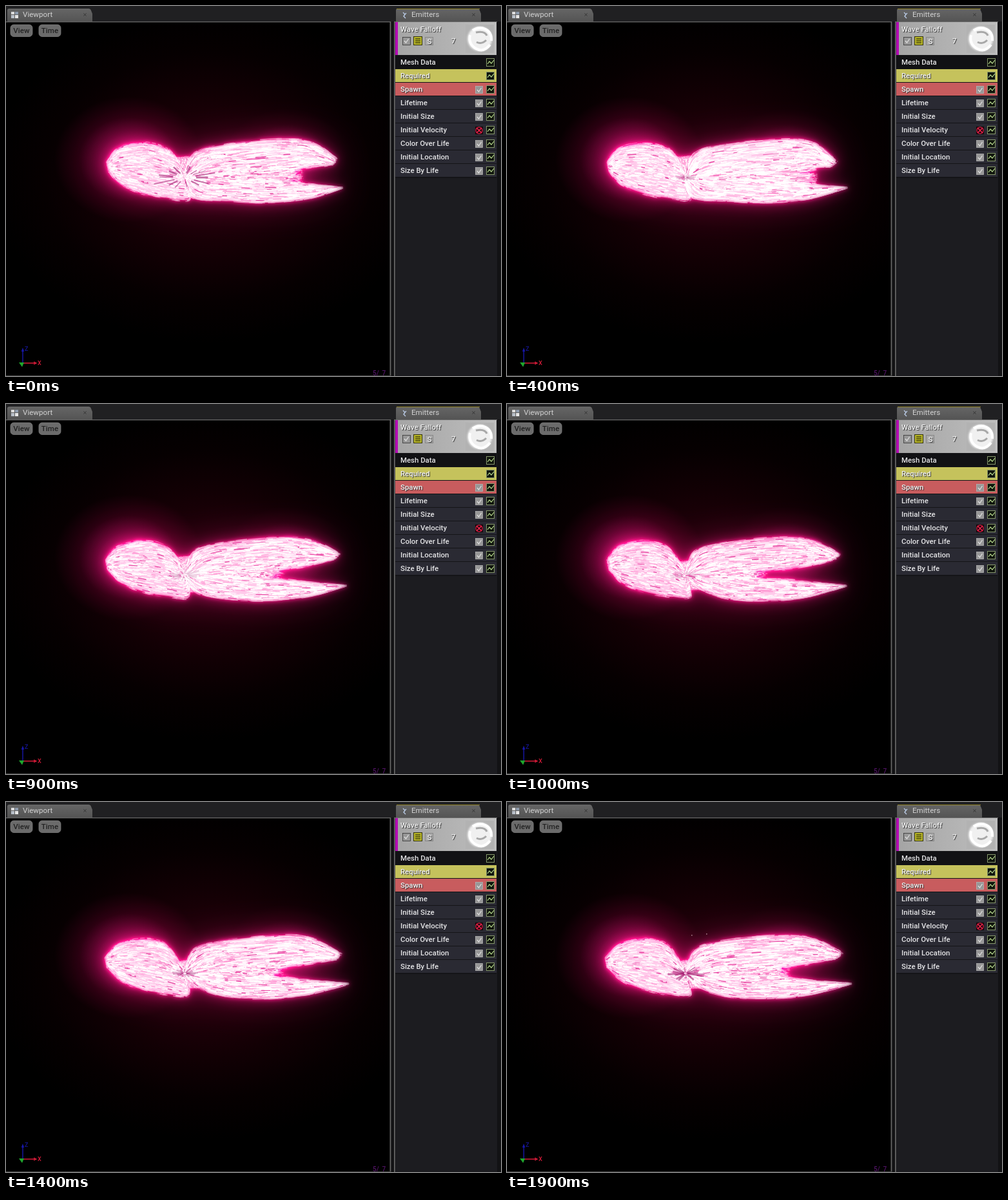
These frames come from a looping animation (768 by 574 pixels, 2000 ms). An HTML page with a canvas:

```html
<!DOCTYPE html>
<html lang="en">
<head>
<meta charset="utf-8">
<title>Wave Falloff</title>
<style>
  html, body { margin: 0; width: 100%; height: 100%; overflow: hidden; background: #1f1f21; }
  canvas, svg { position: absolute; left: 0; top: 0; width: 768px; height: 574px; }
  text { font: 500 11.4px Roboto, sans-serif; fill: #e4e4e6; }
  .tab { font-weight: 400; font-size: 11.6px; fill: #d2d2d2; }
  .button { font-size: 11.6px; fill: #232323; }
  .raised { fill: #f2f2f2; text-shadow: 1px 1px 1px #333; }
</style>
</head>
<body>
<canvas id="view" width="768" height="574"></canvas>
<svg id="ui" viewBox="0 0 768 574"></svg>
<script>
const WIDTH = 768, HEIGHT = 574, STEPS = 20, STEP_MS = 100;
const CENTER = [277, 266];

// ---- Editor panels ----
const box = (x, y, w, h, fill, extra = '') =>
  `<rect x="${x}" y="${y}" width="${w}" height="${h}" fill="${fill}" ${extra}/>`;
const line = (d, stroke, width = 1) =>
  `<path d="${d}" fill="none" stroke="${stroke}" stroke-width="${width}"/>`;
const label = (x, y, text, type = '') => `<text x="${x}" y="${y}" class="${type}">${text}</text>`;
const tab = (x, y, w, text) =>
  `<path d="M${x} 24V${y + 3}q0-3 3-3h${w - 9}q3 0 4 3l2 5v${16 - y}z" fill="url(#tabFill)"/>` +
  label(x + 24, 17, text, 'tab') +
  line(`M${x + w - 13.5} 11.5l4 4m0-4l-4 4`, '#303030');
const button = (x, text) =>
  box(x, 29, 34, 18.5, '#6b6b6b', 'rx="5" stroke="#858585" stroke-width=".7"') +
  `<text x="${x + 17}" y="42" text-anchor="middle" class="button">${text}</text>`;
const checkbox = (x, y, s = 11, edge = '#b4b4b4') =>
  box(x, y, s, s, '#979797', `stroke="${edge}" stroke-width=".8"`) +
  line(`M${x + 2.5} ${y + 5.5}l2.5 3 4-6`, '#e2e2e2', 1.2);
const graph = y =>
  box(745.5, y + 4.5, 12, 12, '#10150d', 'stroke="#86976c"') +
  line(`M747 ${y + 13}l3-4 3 3 4-5`, '#b4d68c', 1.2);
const cross = y =>
  box(728, y + 5, 12, 12, '#16080b') +
  `<circle cx="734" cy="${y + 11}" r="5" fill="none" stroke="#c3183c" stroke-width="1.4"/>` +
  line(`M730 ${y + 7}l8 8m0-8l-8 8`, '#e8234b', 1.7);

const modules = ['Mesh Data', 'Required', 'Spawn', 'Lifetime', 'Initial Size',
  'Initial Velocity', 'Color Over Life', 'Initial Location', 'Size By Life'];
const moduleColors = ['#111114', '#c5c25c', '#c85c5e'];

const moduleRow = (name, i) => {
  const y = 77 + i * 21;
  const toggle = i < 2 ? '' : name === 'Initial Velocity' ? cross(y) : checkbox(728.5, y + 5.5);
  return box(604, y, 157, 20, moduleColors[i] || '#2a2a33') +
    label(612, y + 14.3, name, i === 1 || i === 2 ? 'raised' : '') + toggle + graph(y);
};

const thumbnail = box(713, 29, 44, 44, '#b2b2b2') +
  '<circle cx="735" cy="51" r="19" fill="#f0f0f0" filter="url(#soft)"/>' +
  line('M720 45q-3 14 9 21t22-6M724 38q10-7 20-2t9 18', '#fff', 4) +
  line('M729 41q14-3 17 5M730 56q8 4 15-3', '#a8a8a8', 3);

const emitter = box(604, 25, 157, 51, 'url(#emitterFill)') + box(604, 25, 4, 51, '#b30cb3') +
  label(612, 39.5, 'Wave Falloff', 'raised') + checkbox(615.5, 48.5, 12, '#333') +
  box(632.5, 47.5, 13, 13, '#b8b62a', 'stroke="#33330c"') +
  line('M635 51h8M635 54h8M635 57h8', '#45450c', 1.3) +
  box(650.5, 48.5, 12, 12, '#aaa', 'stroke="#888"') + label(653.5, 58.5, 'S', 'raised') +
  label(691, 58, '7', 'raised') + thumbnail;

const axes = line('M26 554V533M24.5 536l1.5-4 1.5 4', '#1717a8', 1.4) +
  line('M26 554H46M43 552l4 2-4 2', '#d51b38', 1.3) +
  '<path d="M20 553l8 0-3 7z" fill="#1fa62c"/>' +
  '<text x="29" y="535" style="font-size:9px;fill:#15158f">Z</text>' +
  '<text x="49" y="557" style="font-size:9px;fill:#d51b38">X</text>';

document.getElementById('ui').innerHTML = `
  <defs>
    <linearGradient id="tabFill" x2="0" y2="1"><stop stop-color="#666"/><stop offset="1" stop-color="#545454"/></linearGradient>
    <linearGradient id="emitterFill"><stop stop-color="#a4a4a4"/><stop offset="1" stop-color="#bebebe"/></linearGradient>
    <filter id="soft"><feGaussianBlur stdDeviation="1.5"/></filter>
  </defs>` +
  box(0, 0, WIDTH, 24, '#202022') + box(597, 24, 171, 550, '#121214') +
  tab(2, 4, 132, 'Viewport') + tab(605, 4, 132, 'Emitters') +
  box(606, 4, 129, 1, '#918326') +
  box(8, 9, 5, 4, '#ddd') + box(14, 9, 5, 4, '#8e9bad') + box(8, 14, 5, 5, '#b8bfc8') + box(14, 14, 5, 5, '#e6e6e6') +
  line('M616 10l3 3-2 3 3 3M619 13l2-2', '#b9cae5', 1.4) +
  box(0, 24, 597, 1.3, '#656565') + box(595.5, 24, 1.8, 550, '#656565') + box(0, 573, 597, 1, '#3c3c3c') +
  box(602, 24, 160, 550, '#1c1c20') + box(602, 24, 160, 1, '#6a6a6a') + box(602, 24, 1.6, 550, '#6a6a6a') +
  emitter + box(604, 76, 157, 191, '#141417') + modules.map(moduleRow).join('') +
  button(7, 'View') + button(51, 'Time') + axes +
  '<text x="569" y="572.5" style="font-size:10px;fill:#501364;white-space:pre">5/  7</text>';

// ---- Energy plume ----
const poses = [
  { at: 0,  notch: 462, top: 233, bottom: 297, tip: [516, 238], low: 522, white: .86, slots: [18, 56, .75] },
  { at: 4,  notch: 484, top: 232, bottom: 298, tip: [512, 241], low: 526, white: .95, slots: [2, 18, .25] },
  { at: 7,  notch: 488, top: 221, bottom: 300, tip: [517, 232], low: 525, white: 1, slots: [8, 34, .3] },
  { at: 10, notch: 405, top: 243, bottom: 289, tip: [517, 233], low: 525, white: .76, slots: [5, 30, .2] },
  { at: 12, notch: 390, top: 257, bottom: 281, tip: [519, 234], low: 527, white: .72, slots: [4, 22, .15] },
  { at: 16, notch: 488, top: 234, bottom: 298, tip: [519, 238], low: 527, white: .94, slots: [2, 25, .65] },
  { at: 19, notch: 440, top: 245, bottom: 290, tip: [517, 234], low: 528, white: .8, slots: [3, 34, .7] }
];

const mix = (a, b, f) => Array.isArray(a) ? a.map((v, i) => mix(v, b[i], f)) : a + (b - a) * f;

function poseAt(step) {
  const i = poses.findLastIndex(p => p.at <= step);
  const from = poses[i], to = poses[(i + 1) % poses.length];
  const f = (step - from.at) / ((to.at || STEPS) - from.at);
  return Object.fromEntries(Object.keys(from).map(key => [key, mix(from[key], to[key], f)]));
}

// A new wave bursts out every six steps, then draws back
const burstAge = step => (step + 5) % 6;
const pulseAt = step => (1 - burstAge(step) / 6) ** 2;

function seeded(seed) {
  return () => {
    seed = (seed + 0x6D2B79F5) | 0;
    let n = Math.imul(seed ^ (seed >>> 15), 1 | seed);
    n ^= n + Math.imul(n ^ (n >>> 7), 61 | n);
    return ((n ^ (n >>> 14)) >>> 0) / 4294967296;
  };
}

// Catmull-Rom point on an edge
function along(edge, u) {
  const last = edge.length - 1;
  const i = Math.max(0, Math.min(last - 1, Math.floor(u * last)));
  const f = u * last - i;
  const [a, b, c, d] = [-1, 0, 1, 2].map(k => edge[Math.max(0, Math.min(last, i + k))]);
  return [0, 1].map(k => b[k] + .5 * f * (c[k] - a[k] +
    f * (2 * a[k] - 5 * b[k] + 4 * c[k] - d[k] + f * (3 * (b[k] - c[k]) + d[k] - a[k]))));
}
const inFan = (fan, u, v) => mix(along(fan.a, u), along(fan.b, u), v);

// Each fan spreads from the centre between two edges; fray tears its far end
function fansFor({ notch, top, bottom, tip: [tipX, tipY], low }, pulse) {
  const rise = (266 - top) / 45, drop = (bottom - 266) / 34;
  const topLeft = [277 - 19 * rise, top + 1], topRight = [291, Math.min(229, top)];
  const lowStart = [288 + (298 - bottom) * 1.6, bottom];
  const tip = [tipX + 5 * pulse, tipY], lowTip = low + 6 * pulse, left = 156 - 4 * pulse;
  const fan = (count, fray, tone, a, b) => ({ count, fray, tone, a: [CENTER, ...a], b: [CENTER, ...b] });
  return [
    fan(170, .08, .9, [topLeft], [[277 + 14 * rise, top - 1]]),
    fan(130, .06, .85, [[277 + 7 * drop, bottom]], [lowStart]),
    fan(620, .3, .8, [[330, 258], [375, 255], [notch - 25, 250], [notch, 244]],
      [[330, 268], [375, 271], [notch - 25, 273], [notch, 277]]),
    fan(1100, .01, 1, [topLeft, [246, 220], [214, 213], [174, 221], [left, 242]],
      [[285, 299], [252, 298], [214, 291], [178, 277], [left + 3, 257]]),
    fan(1200, .06, 1, [topRight, [340, 215], [425, 207], [476, 212], tip],
      [[330, 262], [375, 260], [425, 257], [470, 251], [tip[0] - 9, tip[1] + 9]]),
    fan(1000, .02, 1, [[330, 267], [380, 270], [430, 272], [480, 277], [lowTip, 281]],
      [lowStart, [350, 303], [410, 305], [470, 299], [lowTip, 283]])
  ];
}

const view = document.getElementById('view').getContext('2d');
const layer = () => Object.assign(document.createElement('canvas'), { width: WIDTH, height: HEIGHT }).getContext('2d');
const plume = layer(), tint = layer();

function fillFan(fan, rand) {
  plume.beginPath();
  for (let i = 0; i <= 24; i++) plume.lineTo(...inFan(fan, i / 25, 0));
  for (let i = 0; i <= 12; i++) plume.lineTo(...inFan(fan, 1 - fan.fray * rand(), i / 12));
  for (let i = 24; i >= 0; i--) plume.lineTo(...inFan(fan, i / 25, 1));
  plume.fillStyle = fan.tone < 1 ? '#ffa9da' : '#ffc9ea';
  plume.fill();
}

function drawStreaks(fan, rand, step, white) {
  const flow = step * 3 / STEPS;
  for (let i = 0; i < fan.count; i++) {
    const u = (rand() + flow) % 1, v = rand() * 1.06 - .03;
    const length = .02 + rand() * .05, shade = rand(), weight = rand();
    const end = 1.01 - fan.fray * rand();
    if (u > end) continue;
    const patch = .14 * Math.sin(u * 16 + v * 11 - flow * Math.PI * 2);
    const bright = white * fan.tone - .06 + patch;
    plume.strokeStyle = shade < bright * .8 ? '#fff' : shade < bright ? '#ffe4f6'
      : shade < .94 ? '#ff9fd6' : '#e84aa4';
    plume.lineWidth = .6 + weight * 1.1;
    plume.beginPath();
    for (let k = 0; k < 3; k++) plume.lineTo(...inFan(fan, Math.min(end, u + length * k / 2), v));
    plume.stroke();
  }
}

function drawSlots([inner, outer, alpha], rand) {
  plume.globalAlpha = alpha * .8;
  plume.strokeStyle = '#a0146a';
  for (let i = 0; i < 15; i++) {
    const angle = (i + rand() * .7) / 15 * Math.PI * 2;
    const reach = mix(inner, outer, .45 + rand() * .55);
    const dx = Math.cos(angle), dy = Math.sin(angle) * .36;
    plume.lineWidth = 1 + rand() * 2;
    plume.beginPath();
    plume.moveTo(CENTER[0] + dx * inner, CENTER[1] + dy * inner);
    plume.lineTo(CENTER[0] + dx * reach, CENTER[1] + dy * reach);
    plume.stroke();
  }
  plume.globalAlpha = 1;
}

function haze(x, y, radius, flatten, colors) {
  view.save();
  view.translate(x, y);
  view.scale(1, flatten);
  const gradient = view.createRadialGradient(0, 0, 0, 0, 0, radius);
  colors.forEach((color, i) => gradient.addColorStop(i / (colors.length - 1), color));
  view.fillStyle = gradient;
  view.fillRect(-radius, -radius, radius * 2, radius * 2);
  view.restore();
}

function drawGlow() {
  view.fillStyle = '#000';
  view.fillRect(0, 0, WIDTH, HEIGHT);
  view.globalCompositeOperation = 'lighter';
  haze(315, 265, 340, .76, ['#2c0010', '#200009', '#120004', '#060001', '#000']);
  haze(190, 238, 115, .85, ['#8c0a50', '#5c0533', '#1c000d', '#000']);
  haze(435, 235, 95, .8, ['#5c0534', '#30031b', '#0c0005', '#000']);
  for (const [blur, alpha] of [[26, .35], [10, .42], [3, .6]]) {
    view.filter = `blur(${blur}px)`;
    view.globalAlpha = alpha;
    view.drawImage(tint.canvas, 0, 0);
  }
  view.filter = 'none';
  view.globalAlpha = 1;
  view.globalCompositeOperation = 'source-over';
}

function draw(step) {
  const pose = poseAt(step), rand = seeded(41), tear = seeded(step + 90);
  const fans = fansFor(pose, pulseAt(step));
  plume.clearRect(0, 0, WIDTH, HEIGHT);
  fans.forEach(fan => fillFan(fan, tear));
  fans.forEach(fan => drawStreaks(fan, rand, step, pose.white));
  drawSlots(pose.slots, seeded(step + 7));

  tint.globalCompositeOperation = 'copy';
  tint.drawImage(plume.canvas, 0, 0);
  tint.globalCompositeOperation = 'source-in';
  tint.fillStyle = '#f0178b';
  tint.fillRect(0, 0, WIDTH, HEIGHT);

  // Feather the white core so that the pink shows at the rim
  plume.globalCompositeOperation = 'destination-in';
  plume.filter = 'blur(2.5px)';
  plume.drawImage(tint.canvas, 0, 0);
  plume.filter = 'none';
  plume.globalCompositeOperation = 'source-over';

  drawGlow();
  view.filter = 'blur(.6px)';
  view.drawImage(plume.canvas, 0, 0);
  view.filter = 'none';
  if (burstAge(step) === 0) {
    view.fillStyle = '#b08a98';
    view.fillRect(286, 206, 1.5, 1.5);
    view.fillRect(309, 204, 1.5, 1.5);
  }
}

let shown = -1;
function tick() {
  const step = Math.floor(performance.now() / STEP_MS) % STEPS;
  if (step !== shown) draw(shown = step);
  requestAnimationFrame(tick);
}
tick();
</script>
</body>
</html>
```
